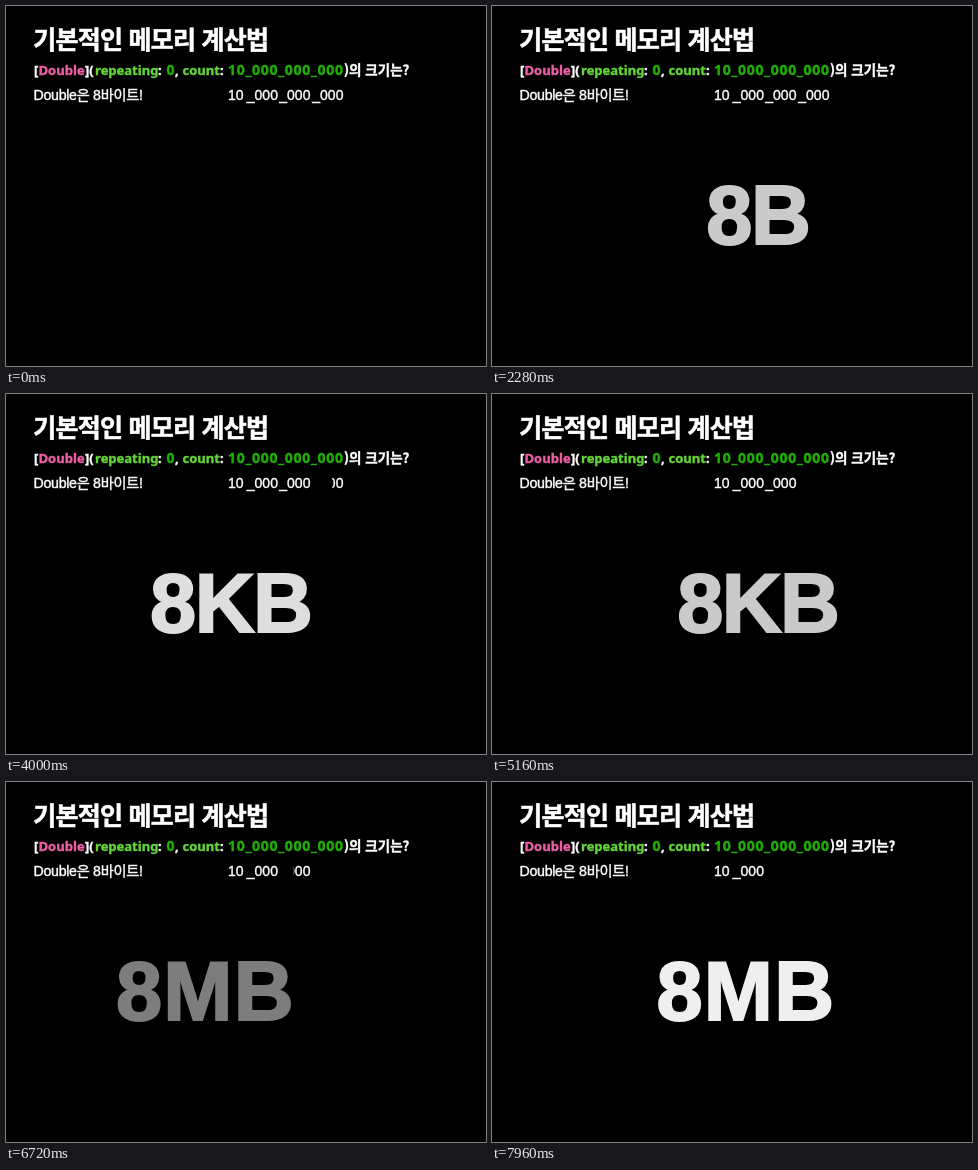
These frames come from a looping animation (480 by 360 pixels, 8 s). An HTML page:

```html
<!DOCTYPE html>
<html lang="ko">
<head>
<meta charset="utf-8">
<title>기본적인 메모리 계산법</title>
<style>
  html, body { margin: 0; width: 100%; height: 100%; overflow: hidden; background: #000; }
  svg { display: block; width: 100%; height: 100%; }
  text, tspan { fill: currentColor; stroke: currentColor; white-space: pre; }
  text { color: #fff; stroke-width: .4px; }
  .title { font: 700 25px "Noto Sans CJK KR", "Noto Sans CJK JP", sans-serif; letter-spacing: -.75px; stroke-width: .6px; }
  .code { font: 700 13px "Noto Sans", "Noto Sans CJK KR", sans-serif; }
  .code .tail { font: 700 13.5px "Noto Sans CJK KR", "Noto Sans CJK JP", sans-serif; }
  .type { color: #ef5fa7; }
  .label { color: #61d836; }
  .num { color: #1db100; font-size: 14px; letter-spacing: .75px; }
  .note { font: 400 14.2px "Liberation Sans", "Noto Sans CJK KR", sans-serif; letter-spacing: -.3px; }
  .count { font: 400 14px "Liberation Sans", Arial, sans-serif; }
  .size { font: 700 83px "Liberation Sans", Arial, sans-serif; text-anchor: middle; stroke-width: 2px; }
</style>
</head>
<body>
<svg viewBox="0 0 480 360">
  <defs>
    <clipPath id="wipeOnes"><rect y="78" width="40" height="24"/></clipPath>
    <clipPath id="wipeThousands"><rect y="78" width="40" height="24"/></clipPath>
  </defs>
  <rect width="480" height="360"/>
  <text class="title" x="27.3" y="42.7">기본적인 메모리 계산법</text>
  <text class="code" y="68.5"><tspan x="28">[</tspan><tspan class="type" x="32.5">Double</tspan><tspan x="79">](</tspan><tspan class="label" x="89">repeating</tspan><tspan x="152">:</tspan><tspan class="num" x="160.5">0</tspan><tspan x="169">,</tspan><tspan class="label" x="176.5">count</tspan><tspan x="214">:</tspan><tspan class="num" x="222">10_000_000_000</tspan><tspan class="tail" x="338">)의 크기는?</tspan></text>
  <text class="note" x="27.5" y="94.3">Double은 8바이트!</text>
  <g class="count">
    <text x="222" y="94.3">10</text>
    <text x="240.8" y="94.3">_000</text>
    <g clip-path="url(#wipeThousands)"><text x="273.3" y="94.3">_000</text></g>
    <g clip-path="url(#wipeOnes)"><text x="306.3" y="94.3">_000</text></g>
  </g>
  <g id="sizes"></g>
</svg>
<script>
  const LOOP = 8000, STEP = 40;
  const MOVE = 760, WIPE = 920, CHUNK = 31;

  const sizes = [
    { text: "8B", x: 239, gap: -1.6, enter: 680, leave: 1920 },
    { text: "8KB", x: 239, gap: -1.6, enter: 3560, leave: 4800 },
    { text: "8MB", x: 240.3, gap: 1.2, enter: 6440, leave: 7680 }
  ];
  const wipes = [
    { id: "wipeOnes", x: 306, start: 3400 },
    { id: "wipeThousands", x: 273, start: 6280 }
  ];

  const clamp = v => Math.min(1, Math.max(0, v));
  const progress = (t, start, length) => clamp((t - start) / length);
  const smooth = v => v * v * (3 - 2 * v);
  // Stays opaque near rest, then fades as q goes to 1.
  const fade = q => 1 - smooth(clamp(1 - 1.34 * (1 - q)));

  const layer = document.getElementById("sizes");
  for (const s of sizes) {
    s.node = document.createElementNS("http://www.w3.org/2000/svg", "text");
    s.node.setAttribute("class", "size");
    s.node.setAttribute("y", 237.5);
    s.node.style.letterSpacing = s.gap + "px";
    s.node.textContent = s.text;
    layer.append(s.node);
  }
  for (const w of wipes) w.rect = document.querySelector("#" + w.id + " rect");

  function draw(t) {
    for (const s of sizes) {
      const q = 1 - progress(t, s.enter, MOVE);
      const r = progress(t, s.leave, MOVE);
      const shift = 201.5 * r ** 2.7 - 63 * q ** 2 - 99 * q ** 4;
      s.node.setAttribute("x", s.x + shift);
      s.node.setAttribute("opacity", fade(q) * fade(r));
    }
    for (const w of wipes) {
      const p = progress(t, w.start, WIPE);
      w.rect.setAttribute("x", p < 1 ? w.x + CHUNK * p - (p ? 0 : 1) : 600);
      w.rect.setAttribute("width", CHUNK * (1 - p) + 2);
    }
  }

  const origin = performance.now();
  function tick() {
    const t = (performance.now() - origin) % LOOP;
    draw(Math.floor(t / STEP) * STEP);
    requestAnimationFrame(tick);
  }
  draw(0);
  requestAnimationFrame(tick);
</script>
</body>
</html>
```
